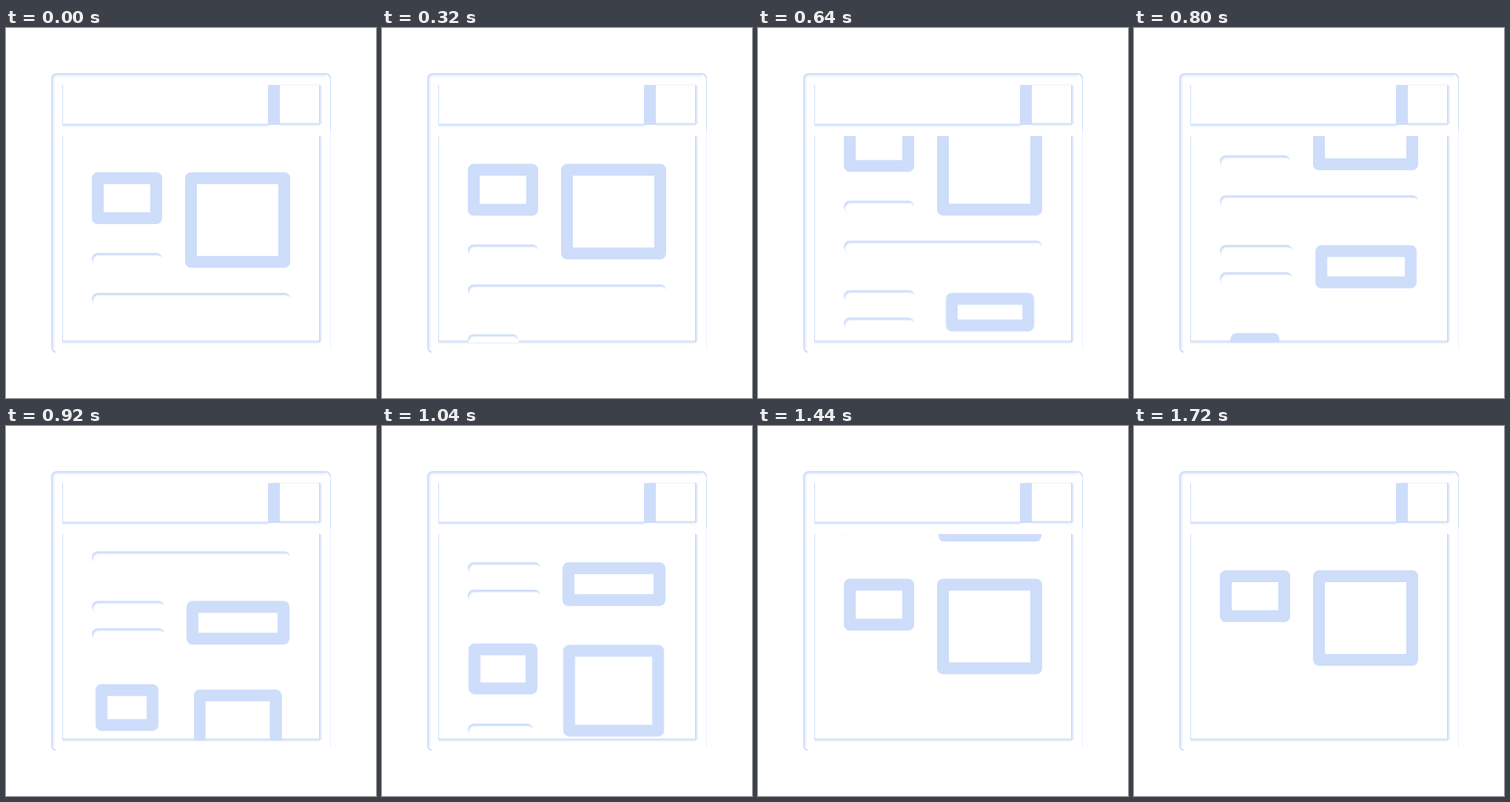
Recreate the animation shown at these times as an HTML page. Size 500x500 px, loop 2000 ms.

```html
<!DOCTYPE html>
<html lang="en">
<head>
<meta charset="utf-8">
<title>Scrolling page</title>
<style>
  html, body { margin: 0; width: 100%; height: 100%; overflow: hidden; background: #fff; }
  svg { display: block; width: 500px; height: 500px; }
  path, rect.box { fill: none; stroke: #cdddfa; }
  .soft { stroke: #eaf1fd; }
  .thick, .box { stroke-width: 16; stroke-linejoin: round; vector-effect: non-scaling-stroke; }
  .box { transform-box: fill-box; transform-origin: center; }
  .bar path { stroke-width: 16; stroke-linecap: round; vector-effect: non-scaling-stroke; }
  .bar path:nth-child(2) { stroke: #e9f0fd; }
  .bar path:nth-child(3) { stroke: #fff; }
  .bar { transform-origin: 124px 0; }

  .scroll, .pop, .grow, .flash {
    animation: 800ms cubic-bezier(.58, 0, .42, 1) var(--d, 0ms) both paused;
  }
  .scroll { animation-name: scroll; animation-duration: 1680ms; --d: 40ms; }
  .pop { animation-name: pop; }
  .grow { animation-name: grow; }
  .flash { animation-name: flash; }
  .slow { animation-duration: 1070ms; }
  @keyframes scroll { to { transform: translateY(-339px); } }
  @keyframes pop { from { transform: scale(0); } to { transform: scale(1); } }
  @keyframes grow { from { transform: scaleX(0); } to { transform: scaleX(1); } }
  @keyframes flash {
    from { transform: scaleX(0); visibility: visible; }
    to { transform: scaleX(1); visibility: hidden; }
  }
</style>
</head>
<body>
<svg viewBox="0 0 500 500">
  <clipPath id="page"><rect x="77" y="146" width="346" height="279"/></clipPath>

  <!-- window -->
  <g stroke-width="2">
    <path class="soft" d="M64 433V70Q64 64 70 64H432" stroke-width="3"/>
    <path class="soft" d="M77 132.5H354M77 425.5H424M426 147V424M426 78V130M370 131.5H424"/>
    <path class="soft" d="M438.5 138V434M370 77H424" stroke-width="1"/>
    <path d="M67 438Q62 437 62 431V69Q62 62 69 62H431Q437 62 438 67"/>
    <path d="M438.5 66V138M76.5 77V131M76.5 146V424" stroke-width="1"/>
    <path d="M76 130.5H356M370 129.5H424V77M76 423.5H424V146"/>
    <path d="M362 77V131" stroke-width="16"/>
  </g>

  <!-- page content -->
  <g clip-path="url(#page)">
    <g class="scroll" id="content"></g>
  </g>
</svg>
<script>
  const content = document.getElementById('content');

  const box = (x, y, w, h, delay) =>
    `<rect class="box ${delay === undefined ? '' : 'pop'}" style="--d:${delay || 0}ms"
      x="${x}" y="${y}" width="${w}" height="${h}"/>`;

  const bar = (y, w, motion = '', delay = 0) => {
    const line = (dx, dy) => `<path d="M${124 + dx} ${y + dy}h${w}"/>`;
    return `<g class="bar ${motion}" style="--d:${delay}ms">` +
      line(0, 0) + line(1, 2.5) + line(2, 3.8) + '</g>';
  };

  const next = 339;
  content.innerHTML = [
    box(124, 203, 79, 54),
    box(250, 203, 126, 113),
    bar(312, 79),
    bar(366, 252),

    bar(433, 82, 'grow slow', -276),
    bar(470, 82, 'grow', -22),
    box(252, 433, 123, 43, 98),

    box(124, 203 + next, 79, 54, 355),
    box(250, 203 + next, 126, 113, 393),
    bar(312 + next, 79, 'flash', 440),
    bar(366 + next, 252, 'flash', 534)
  ].join('');

  // Every animation follows one looping clock that ticks in 40 ms steps.
  const loop = 2000, tick = 40;
  const parts = document.getAnimations();
  const start = performance.now();
  function draw() {
    const t = (performance.now() - start) % loop;
    const time = Math.floor(t / tick) * tick;
    for (const part of parts) part.currentTime = time;
    requestAnimationFrame(draw);
  }
  draw();
</script>
</body>
</html>
```
